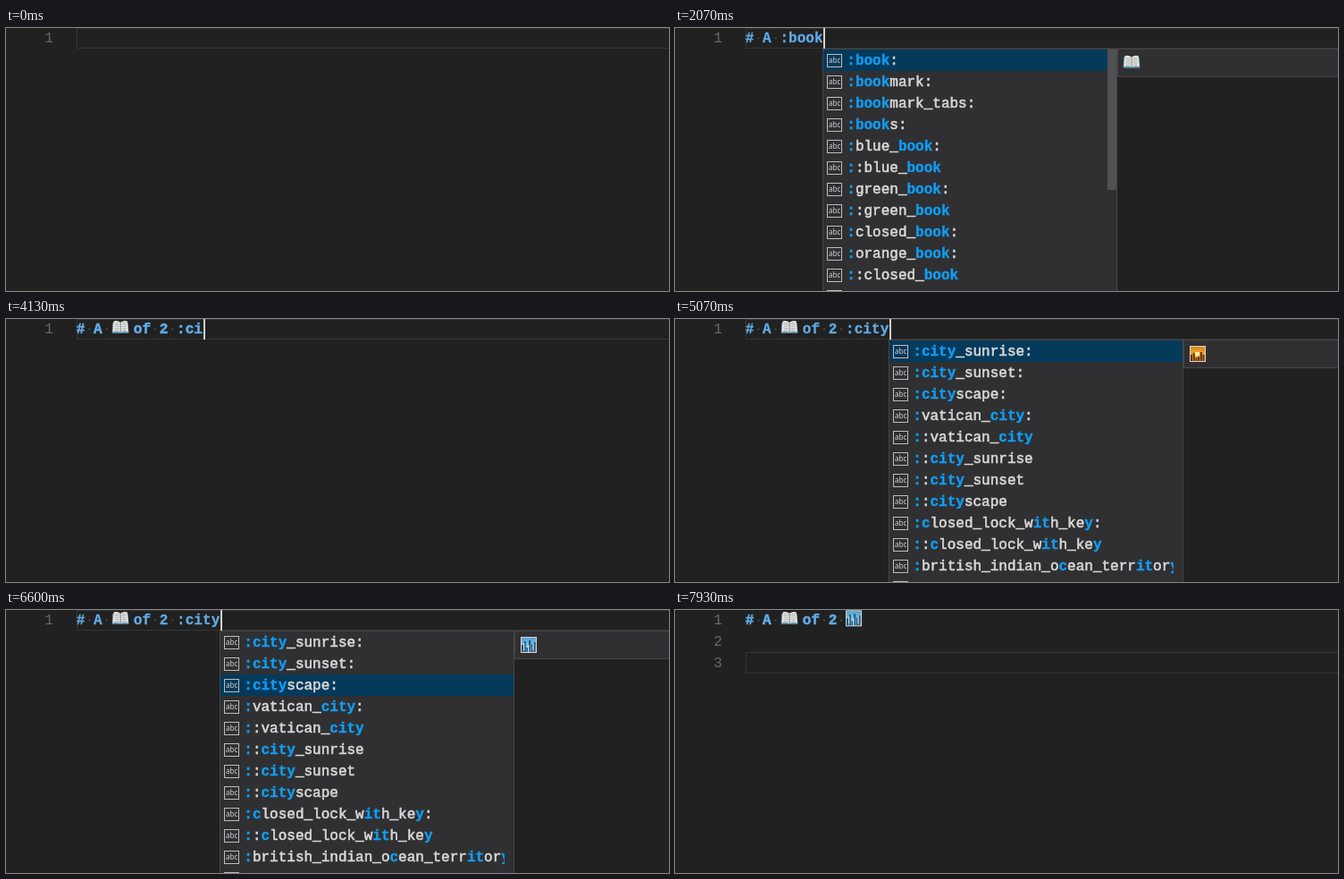
An HTML page with a canvas for the animation above (8000 ms loop, 742 px wide and 294 px high).

```html
<!DOCTYPE html>
<html lang="en">
<head>
<meta charset="utf-8">
<title>Emoji completion</title>
<style>
html, body { margin: 0; width: 100%; height: 100%; overflow: hidden; background: #212121; }
canvas { display: block; }
</style>
</head>
<body>
<canvas id="stage" width="742" height="294"></canvas>
<script>
const ctx = document.getElementById('stage').getContext('2d');
const LOOP = 8000, LINE = 24, LEFT = 78.8;
const CELL = 9.65, ROW_CELL = 9.6;
const MONO = '"Liberation Mono", "Courier New", monospace';
const BLUE = '#61abe6', MATCH = '#0f9ff8', PALE = '#d8d8d8';

// Typed text over time; @ is the book, % the cityscape
const typing = [
  [0, ''], [70, '#'], [270, '# '], [470, '# A'], [600, '# A '],
  [870, '# A :'], [1000, '# A :b'], [1130, '# A :bo'], [1330, '# A :boo'],
  [1800, '# A :book'], [2530, '# A @'], [2800, '# A @ '], [2930, '# A @ o'],
  [3000, '# A @ of'], [3130, '# A @ of '], [3330, '# A @ of 2'],
  [3530, '# A @ of 2 '], [3870, '# A @ of 2 :'], [4000, '# A @ of 2 :c'],
  [4130, '# A @ of 2 :ci'], [4330, '# A @ of 2 :cit'],
  [4530, '# A @ of 2 :city'], [6800, '# A @ of 2 %']
];
const caretLine = [[0, 1], [7200, 2], [7400, 3]];

// Square brackets mark the matched letters
const popups = [
  { from: 1930, to: 2530, x: 165, edge: 495, detail: 2000, thumb: true,
    picks: [[0, 0]], icons: [drawBook],
    rows: ['[:book]:', '[:book]mark:', '[:book]mark_tabs:', '[:book]s:',
      '[:]blue_[book]:', '[:]:blue_[book]', '[:]green_[book]:',
      '[:]:green_[book]', '[:]closed_[book]:', '[:]orange_[book]:',
      '[:]:closed_[book]', ''] },
  { from: 5000, to: 6800, x: 239, edge: 569, detail: 5070,
    picks: [[0, 0], [5400, 1], [6400, 2]],
    icons: [drawSunrise, drawSunset, drawCity],
    rows: ['[:city]_sunrise:', '[:city]_sunset:', '[:city]scape:',
      '[:]vatican_[city]:', '[:]:vatican_[city]', '[:]:[city]_sunrise',
      '[:]:[city]_sunset', '[:]:[city]scape', '[:c]losed_lock_w[it]h_ke[y]:',
      '[:]:[c]losed_lock_w[it]h_ke[y]',
      '[:]british_indian_o[c]ean_terr[it]or[y]:', ''] }
];

function at(list, t) {
  let value = list[0][1];
  for (const [start, v] of list) if (t >= start) value = v;
  return value;
}

function rect(color, x, y, w, h) {
  ctx.fillStyle = color;
  ctx.fillRect(x, y, w, h);
}

function frame(color, x, y, w, h) {
  ctx.strokeStyle = color;
  ctx.lineWidth = 1;
  ctx.strokeRect(x, y, w, h);
}

function poly(color, points) {
  ctx.fillStyle = color;
  ctx.beginPath();
  points.forEach(([x, y]) => ctx.lineTo(x, y));
  ctx.fill();
}

function glyph(ch, x, y, color, heavy = 0, weight = 'bold') {
  ctx.font = `${weight} 16px ${MONO}`;
  ctx.fillStyle = ctx.strokeStyle = color;
  ctx.fillText(ch, x, y);
  if (heavy) {
    ctx.lineWidth = heavy;
    ctx.strokeText(ch, x, y);
  }
}

function drawBook(x, y) {
  ctx.save();
  ctx.translate(x, y);
  ctx.scale(0.95, 0.95);
  poly('#5f8fa8', [[0, 3], [18.5, 3], [19.3, 15.5], [-0.3, 15.5]]);
  for (const side of [-1, 1]) {
    ctx.save();
    ctx.translate(9.5, 0);
    ctx.scale(side, 1);
    ctx.fillStyle = '#e9e9e6';
    ctx.beginPath();
    ctx.moveTo(0, 2.5);
    ctx.quadraticCurveTo(4, -0.3, 8, 1.2);
    ctx.lineTo(9.2, 13.8);
    ctx.quadraticCurveTo(4, 12, 0, 14.5);
    ctx.fill();
    for (let i = 0; i < 5; i++) rect('#a3a5a6', 1.6, 3.2 + i * 2, 5.4, 0.8);
    ctx.restore();
  }
  rect('#77797b', 9, 2.5, 1, 12);
  ctx.restore();
}

function skyline(x, y, sky, low, tower, heights) {
  ctx.save();
  ctx.translate(x, y);
  const fill = ctx.createLinearGradient(0, 0, 0, 18);
  fill.addColorStop(0, sky);
  fill.addColorStop(1, low);
  rect('#d9d3c6', 0, 0, 18, 18);
  rect(fill, 1, 1, 16, 16);
  heights.forEach((h, i) => rect(tower, 1 + i * 2.7, 17 - h, 2.1, h));
  ctx.restore();
}

function drawSunrise(x, y) {
  skyline(x, y, '#d9851c', '#fbc23c', '#6b3110', [7, 9, 4, 5, 10, 7]);
  ctx.fillStyle = '#fff3a0';
  ctx.beginPath();
  ctx.arc(x + 8.5, y + 9, 2.6, 0, 7);
  ctx.fill();
}

function drawSunset(x, y) {
  skyline(x, y, '#c9603a', '#f6a63c', '#56301f', [7, 10, 4, 6, 11, 7]);
}

function drawCity(x, y) {
  skyline(x, y, '#4c9fd4', '#a9dcf3', '#24577c', [8, 12, 5, 13, 9, 11]);
  for (let i = 0; i < 3; i++) rect('#d9f1fb', x + 3.2 + i * 5.1, y + 7 + i % 2 * 2, 1, 8);
}

// Returns the x where the text ends
function drawHeading(text, heading, heavy) {
  let x = LEFT, prev = '';
  for (const ch of text) {
    if (ch === '@') {
      drawBook(x + 1.7, 1.3);
      x += 20.4;
    } else if (ch === '%') {
      drawCity(x, 0.3);
      x += 20;
    } else if (ch === ' ') {
      const w = prev === '@' ? 5 : CELL;
      if (w === CELL) rect('#47535d', x + 4, 10.5, 1.8, 1.8);
      x += w;
    } else {
      glyph(ch, x, 16, heading ? BLUE : PALE, heavy, heading ? 'bold' : 'normal');
      x += CELL;
    }
    prev = ch;
  }
  return x;
}

function drawRow(row, x, y) {
  frame('#bdbdbd', x + 5.5, y + 5.5, 16, 14);
  ctx.font = '8px "Noto Sans", sans-serif';
  ctx.fillStyle = '#d2d2d2';
  ctx.fillText('abc', x + 7, y + 15.2);
  let pos = x + 27.3, hit = false;
  for (const ch of row) {
    if (ch === '[' || ch === ']') hit = ch === '[';
    else {
      glyph(ch, pos, y + 17, hit ? MATCH : PALE, hit ? 0.35 : 0.6, hit ? 'bold' : 'normal');
      pos += ROW_CELL;
    }
  }
}

function drawPopup(p, t) {
  const pick = at(p.picks, t), w = p.edge - p.x;
  rect('#303032', p.x, 23, w, 271);
  rect('#053a5b', p.x + 1, 24 + pick * LINE, w - 1, LINE);
  ctx.save();
  ctx.beginPath();
  ctx.rect(p.x, 23, w - 11, 271);
  ctx.clip();
  p.rows.forEach((row, i) => drawRow(row, p.x, 24 + i * LINE));
  ctx.restore();
  if (p.thumb) {
    rect('#303032', p.edge - 11, 24, 10, 270);
    rect('#515153', p.edge - 11, 24, 10, 157);
  }
  frame('#464647', p.x + 0.5, 23.5, w - 1, 280);
  if (t >= p.detail) {
    rect('#303032', p.edge, 23, 742 - p.edge, 32);
    frame('#464647', p.edge + 0.5, 23.5, 760 - p.edge, 31);
    p.icons[pick](p.edge + 7, 30);
  }
}

function draw(t) {
  rect('#212121', 0, 0, 742, 294);
  const line = at(caretLine, t), text = at(typing, t);
  const popup = popups.find(p => t >= p.from && t < p.to);
  const top = (line - 1) * LINE;

  const boxTop = Math.max(0.5, top - 0.5);
  frame('#353535', 79.5, boxTop, 680, top + 22.5 - boxTop);
  for (let n = 1; n <= line; n++) {
    glyph(n, 43.2, 16 + (n - 1) * LINE, '#686868', 0, 'normal');
  }
  const end = drawHeading(text, t >= 470, popup ? 0.3 : 0.6);
  if (t >= 70 && t < 7930) {
    const x = line > 1 ? 79 : Math.round(end + 0.6);
    rect('#d0d0cc', x, Math.max(0, top - 1), 2, line > 1 ? 24 : 23);
  }
  if (popup) drawPopup(popup, t);
}

const start = performance.now();
function tick() {
  draw((performance.now() - start) % LOOP);
  requestAnimationFrame(tick);
}
tick();
</script>
</body>
</html>
```
